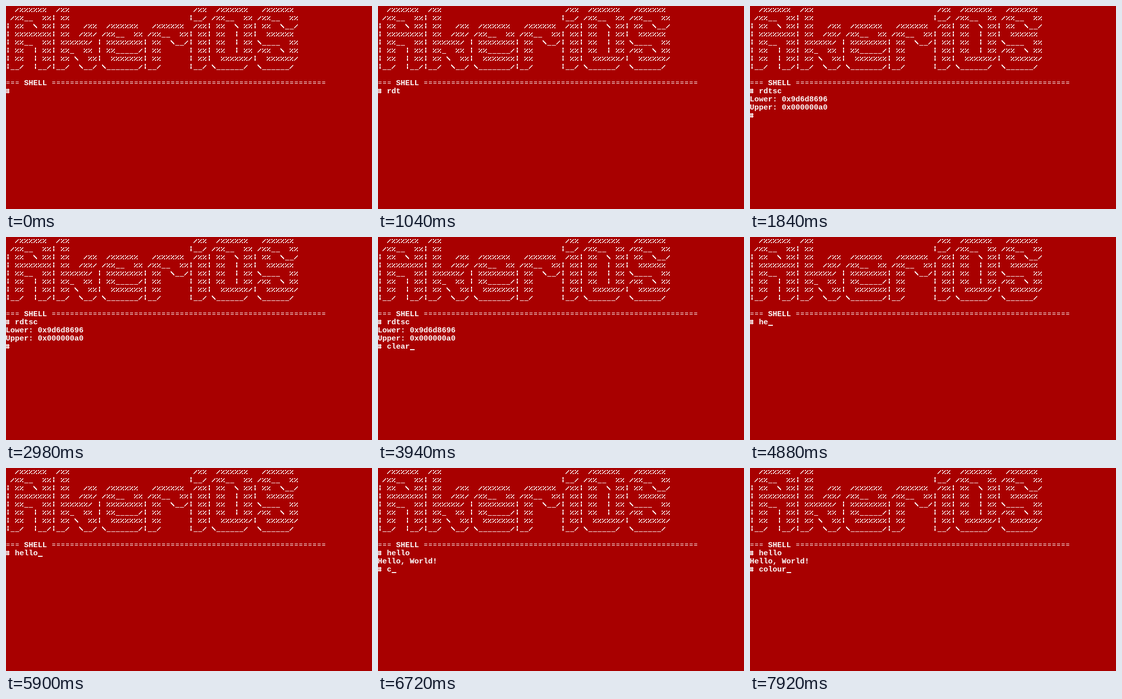
Write an HTML page with a canvas that moves like this. It is 720 px wide and 400 px high and loops after 8 s.

```html
<!DOCTYPE html>
<html lang="en">
<head>
<meta charset="utf-8">
<title>Shell</title>
<style>
html, body { margin: 0; width: 100%; height: 100%; overflow: hidden; background: #a80000; }
canvas { display: block; width: 720px; height: 400px; }
</style>
</head>
<body>
<canvas id="screen" width="720" height="400"></canvas>
<script>
const LOOP = 8000, CELL_W = 9, CELL_H = 16;
const BACK = '#a80000', INK = '#fcfcfc';
const ctx = document.getElementById('screen').getContext('2d', { alpha: false });

const banner = String.raw`  /%%%%%%  /%%                           /%%  /%%%%%%   /%%%%%%
 /%%__  %%| %%                          |__/ /%%__  %% /%%__  %%
| %%  \ %%| %%   /%%  /%%%%%%   /%%%%%%  /%%| %%  \ %%| %%  \__/
| %%%%%%%%| %%  /%%/ /%%__  %% /%%__  %%| %%| %%  | %%|  %%%%%%
| %%__  %%| %%%%%%/ | %%%%%%%%| %%  \__/| %%| %%  | %% \____  %%
| %%  | %%| %%_  %% | %%_____/| %%      | %%| %%  | %% /%%  \ %%
| %%  | %%| %% \  %%|  %%%%%%%| %%      | %%|  %%%%%%/|  %%%%%%/
|__/  |__/|__/  \__/ \_______/|__/      |__/ \______/  \______/`.split('\n');
const header = [...banner, '', '=== SHELL ' + '='.repeat(60)];

// Each scene: when it appears, the lines above the prompt, the word typed and its key times.
const scenes = [
  { from: 0, lines: [], word: 'rdtsc', keys: [380, 720, 1040, 1240, 1360] },
  { from: 1840, lines: ['# rdtsc', 'Lower: 0x9d6d8696', 'Upper: 0x000000a0'],
    word: 'clear', keys: [3420, 3520, 3620, 3740, 3840] },
  { from: 4300, lines: [], word: 'hello', keys: [4760, 4880, 5040, 5160, 5400] },
  { from: 5940, lines: ['# hello', 'Hello, World!'],
    word: 'colour', keys: [6720, 7160, 7280, 7500, 7600, 7920] }
];

// Cursor toggles, starting hidden.
const blinks = [60, 380, 720, 1040, 1360, 1700, 2020, 2340, 2660, 2980, 3300, 3620, 3940,
  4300, 4620, 4940, 5260, 5580, 5900, 6220, 6540, 7040, 7360, 7680, 7920];

const passed = (times, t) => times.filter(v => v <= t).length;
const bar = (x, y, w, h) => ctx.fillRect(x, y, w, h);

// Stepped diagonal, clipped to a seven pixel wide cell.
function diagonal(x, y, rows, width, start, dir) {
  for (let i = 0; i < rows; i++) {
    const a = start + dir * i;
    const left = Math.max(0, a), right = Math.min(7, a + width);
    bar(x + left, y + i, right - left, 1);
  }
}

const slash = (x, y) => diagonal(x, y + 4, 8, 2, 6, -1);

const shapes = {
  '/': slash,
  '\\': (x, y) => diagonal(x, y + 3, 9, 3, -2, 1),
  '%': (x, y) => {
    slash(x, y);
    bar(x, y + 4, 2, 2);
    bar(x + 5, y + 10, 2, 2);
  },
  '|': (x, y) => {
    bar(x + 3, y + 2, 2, 4);
    bar(x + 3, y + 7, 2, 5);
  },
  '_': (x, y) => bar(x, y + 13, 8, 1),
  '=': (x, y) => {
    bar(x + 1, y + 5, 6, 1);
    bar(x + 1, y + 8, 6, 1);
  },
  '#': (x, y) => {
    bar(x + 1, y + 3, 2, 9);
    bar(x + 4, y + 3, 2, 9);
    bar(x, y + 5, 7, 1);
    bar(x, y + 9, 7, 1);
  }
};

function print(line, row) {
  [...line].forEach((ch, col) => {
    const x = col * CELL_W, y = row * CELL_H;
    if (shapes[ch]) shapes[ch](x, y);
    else if (ch !== ' ') ctx.fillText(ch, x - 0.5, y + 12);
  });
}

function draw(t) {
  const scene = scenes[passed(scenes.map(s => s.from), t) - 1];
  const prompt = '# ' + scene.word.slice(0, passed(scene.keys, t));
  const lines = [...header, ...scene.lines, prompt];
  ctx.fillStyle = BACK;
  bar(0, 0, 720, 400);
  ctx.fillStyle = INK;
  ctx.font = 'bold 15px "Liberation Mono", monospace';
  lines.forEach(print);
  if (passed(blinks, t) % 2) {
    bar(prompt.length * CELL_W, (lines.length - 1) * CELL_H + 13, CELL_W, 2);
  }
}

const began = performance.now();
function tick() {
  draw((performance.now() - began) % LOOP);
  requestAnimationFrame(tick);
}
tick();
</script>
</body>
</html>
```
